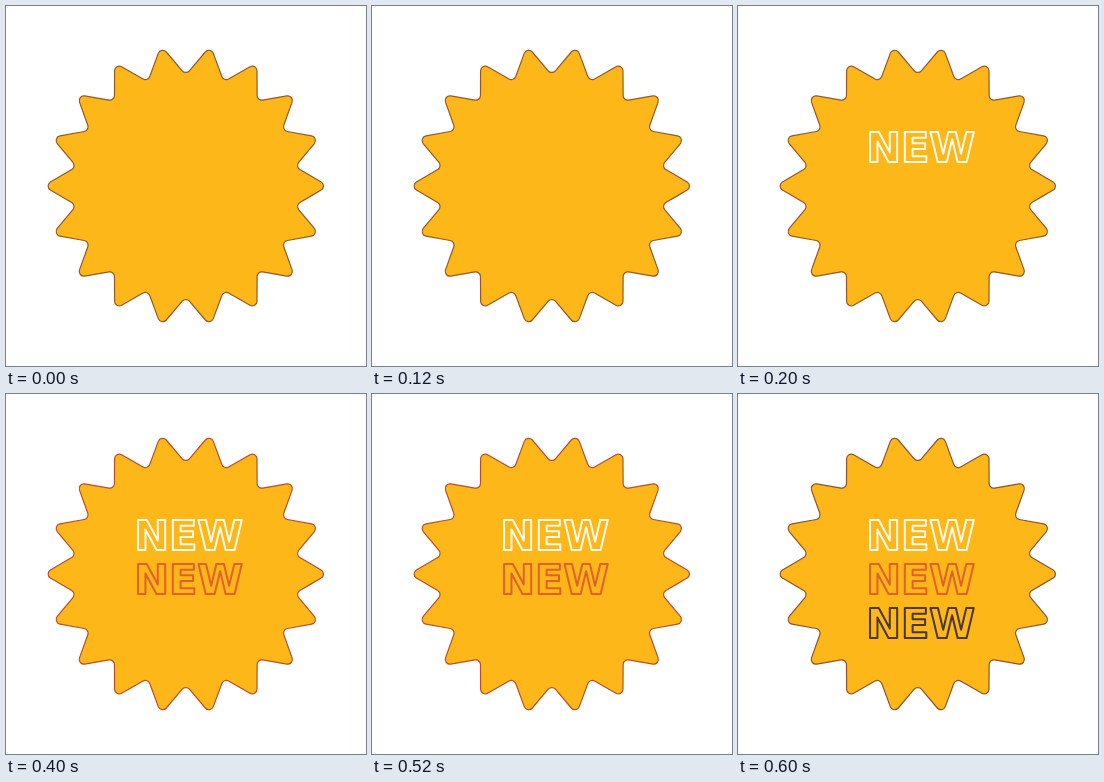
These frames come from a looping animation (360 by 360 pixels, 800 ms). An HTML page with a canvas:

```html
<!DOCTYPE html>
<html lang="en">
<head>
<meta charset="utf-8">
<title>New badge</title>
<style>
  html, body { margin: 0; width: 100%; height: 100%; overflow: hidden; background: #fff; }
  canvas { display: block; width: 360px; height: 360px; }
</style>
</head>
<body>
<canvas width="360" height="360"></canvas>
<script>
const ctx = document.querySelector('canvas').getContext('2d');
const STEP = 200, POINTS = 18, CX = 179.8, CY = 180;
const TIP = 142.3, VALLEY = 111;
const lines = ['#fffaf0', '#e4602a', '#4a3632'];
const edges = ['#94582a', '#94582a', '#b84e2c', '#8c5430'];

// Corners alternate between tips and valleys.
function corner(i) {
  const a = i * Math.PI / POINTS;
  const r = i % 2 ? VALLEY : TIP;
  return [CX + r * Math.cos(a), CY + r * Math.sin(a)];
}

function starPath() {
  const path = new Path2D();
  const [x0, y0] = corner(0), [x1, y1] = corner(1);
  path.moveTo((x0 + x1) / 2, (y0 + y1) / 2);
  for (let i = 1; i <= POINTS * 2; i++) {
    path.arcTo(...corner(i), ...corner(i + 1), 4.7);
  }
  path.closePath();
  return path;
}

const star = starPath();

function draw(step) {
  ctx.fillStyle = '#fff';
  ctx.fillRect(0, 0, 360, 360);
  ctx.fillStyle = '#fdb718';
  ctx.fill(star);
  ctx.lineWidth = 1.2;
  ctx.strokeStyle = edges[step];
  ctx.stroke(star);

  ctx.font = 'bold 41.5px "DejaVu Sans", sans-serif';
  ctx.lineJoin = 'round';
  ctx.lineWidth = 2;
  lines.slice(0, step).forEach((color, row) => {
    ctx.strokeStyle = color;
    ctx.strokeText('NEW', 128.2, 156.4 + row * 43.8);
  });
}

function tick(now) {
  draw(Math.floor(now / STEP) % 4);
  requestAnimationFrame(tick);
}
tick(0);
</script>
</body>
</html>
```
